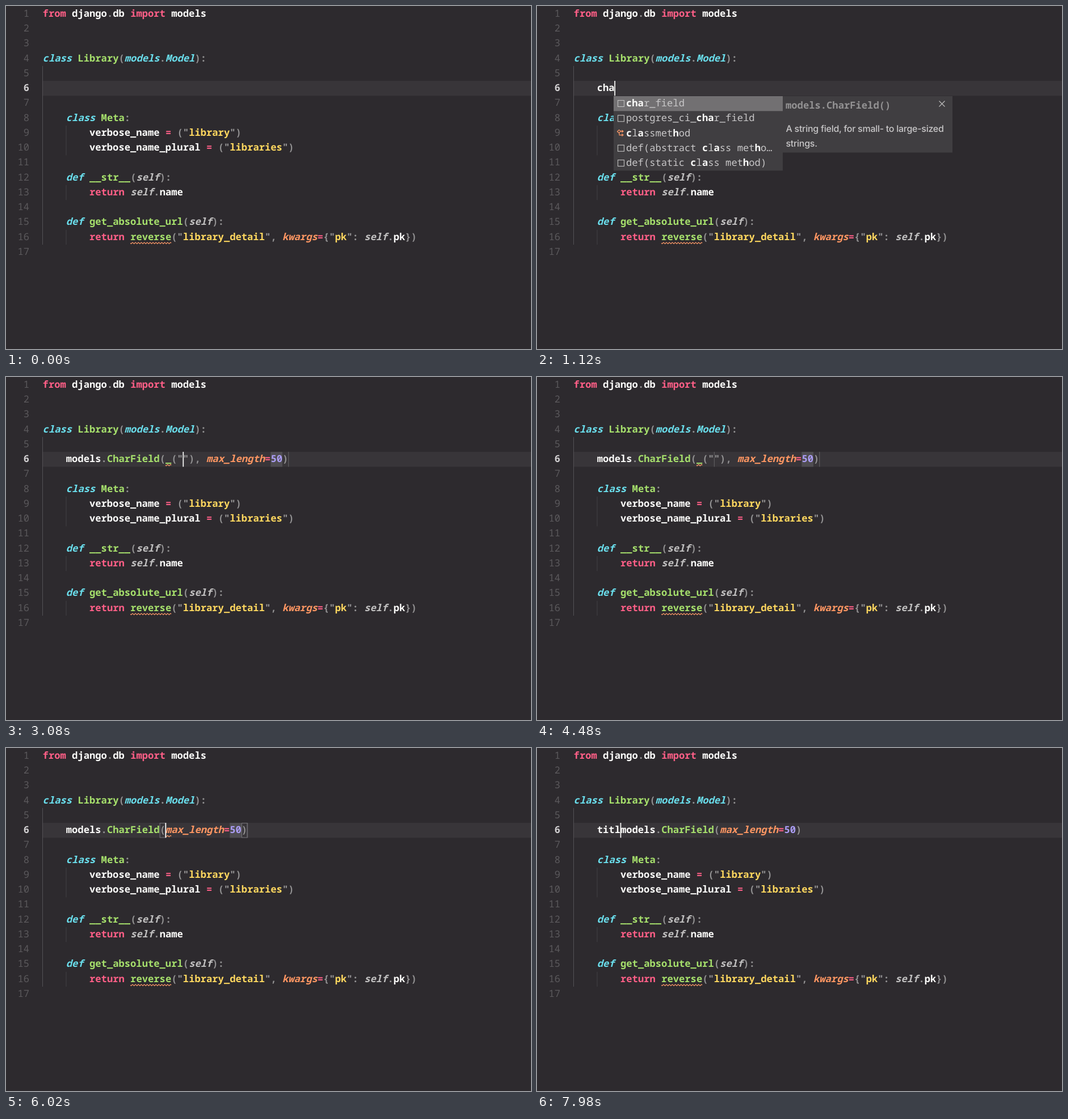
Animation, 925 px wide and 605 px high, one loop 8 s. Source, as an HTML page:

```html
<!DOCTYPE html>
<html lang="en">
<head>
<meta charset="utf-8">
<title>Model snippet</title>
<style>
  html, body { margin: 0; height: 100%; overflow: hidden; background: #2d2a2e; }
  svg { display: block; }
  text {
    font: 600 17.17px "Noto Sans Mono", monospace;
    white-space: pre;
    text-rendering: geometricPrecision;
  }
  .w { fill: #fcfcfa; }
  .g { fill: #939293; }
  .p { fill: #ff5f87; }
  .n { fill: #a6e06c; }
  .y { fill: #ffd85f; }
  .v { fill: #ab9df5; }
  .c { fill: #6adeec; font-style: italic; }
  .o { fill: #fe9662; font-style: italic; }
  .s { fill: #c1c0c0; font-style: italic; }
  .k { fill: #c8c7c8; font-weight: 500; }
  .b { fill: #fcfcfa; font-weight: 800; }
  .num { fill: #5b595c; text-anchor: end; font-weight: 500; }
  .now { fill: #d0ced0; font-weight: 600; }
  .doc { font: 500 16px Inter, sans-serif; letter-spacing: -.27px; fill: #c8c7c8; }
  .line { fill: none; stroke: #c1c0c0; stroke-width: 1.1; }
  .wave, .symbol { fill: none; stroke: #fc9867; stroke-width: 1.2; }
</style>
</head>
<body>
<svg id="stage" width="925" height="605"></svg>
<script>
const LEFT = 64.6, CHAR = 10.302, ROW = 26.27, LOOP = 8000;
const colX = col => LEFT + col * CHAR;
const rowY = row => 0.7 + (row - 1) * ROW;

// Code is split by "~"; the first letter of each piece is its style.
const code = {
  1: 'pfrom~w django~g.~wdb ~pimport~w models',
  4: 'cclass ~nLibrary~g(~cmodels~g.~cModel~g):',
  8: 'w    ~cclass ~nMeta~g:',
  9: 'w        verbose_name ~p=~g ("~ylibrary~g")',
  10: 'w        verbose_name_plural ~p=~g ("~ylibraries~g")',
  12: 'w    ~cdef ~n__str__~g(~sself~g):',
  13: 'w        ~preturn ~sself~g.~wname',
  15: 'w    ~cdef ~nget_absolute_url~g(~sself~g):',
  16: 'w        ~preturn ~nreverse~g("~ylibrary_detail~g", ~okwargs~p=~g{"~ypk~g": ~sself~g.~wpk~g})'
};

const field = (args = '', name = '') =>
  `w    ${name}models~g.~nCharField~g(${args}~omax_length~p=~v50~g)`;
const typed = name => 'w    ' + name;
const full = field('~n_~g(""), ');

// time, line 6, caret column, caret visible, marks: h snippet, s squiggle, b brackets, 5/2 popup rows
const states = [
  [0, typed(''), 4, 0, ''],
  [140, typed(''), 4, 1, ''],
  [560, typed(''), 4, 0, ''],
  [840, typed('c'), 5, 1, ''],
  [1120, typed('cha'), 7, 1, '5'],
  [1260, typed('char'), 8, 1, '2'],
  [1820, typed('char'), 8, 0, '2'],
  [2100, full, 24, 1, 'h'],
  [2520, full, 24, 0, 'h'],
  [3080, full, 24, 1, 'hs'],
  [3500, full, 24, 0, 'hs'],
  [4060, full, 24, 1, 'hs'],
  [4480, full, 24, 0, 'hs'],
  [4760, field('~n_~g(), '), 23, 1, 'hs'],
  [4900, field('~n_~g, '), 22, 1, 'hs'],
  [5040, field(', '), 21, 1, 'hs'],
  [5180, field(', '), 21, 1, 'hsb'],
  [5600, field(', '), 21, 0, 'hsb'],
  [5740, field(' '), 21, 1, 'hsb'],
  [6020, field(), 21, 1, 'hsb'],
  [6440, field(), 21, 0, 'hsb'],
  [6580, field(), 21, 1, 'b'],
  [6720, field(), 20, 1, 'b'],
  [6860, field(), 11, 1, ''],
  [7000, field(), 4, 1, ''],
  [7560, field('', 't'), 5, 1, ''],
  [7700, field('', 'ti'), 6, 1, ''],
  [7840, field('', 'tit'), 7, 1, ''],
  [7980, field('', 'titl'), 8, 1, '']
];

// Each suggestion as matched by "cha" and by "char".
const suggestions = [
  ['bcha~kr_field', 'bchar~k_field'],
  ['kpostgres_ci_~bcha~kr_field', 'kpostgres_ci_~bchar~k_field'],
  ['bc~kl~ba~kssmet~bh~kod'],
  ['kdef(abstract ~bc~kl~ba~kss met~bh~ko…'],
  ['kdef(static ~bc~kl~ba~kss met~bh~kod)']
];

const rect = (x, y, w, h, fill) =>
  `<rect x="${x}" y="${y}" width="${w}" height="${h}" fill="${fill}"/>`;
const frame = (x, y, w, h) =>
  `<rect class="line" x="${x}" y="${y}" width="${w}" height="${h}"/>`;
const text = (x, y, style, value) =>
  `<text x="${x}" y="${y}" class="${style}">${value}</text>`;
const path = (style, d) => `<path class="${style}" d="${d}"/>`;
const wave = (col, row, chars) =>
  path('wave', `M${colX(col)} ${rowY(row) + 23.4}` + 'l1.3 1.2l2.5 -2.4l1.35 1.2'.repeat(chars * 2));
const columns = line => line.split('~').join('').length - line.split('~').length;

function tokens(line, x, y) {
  return line.split('~').map(piece => {
    const out = text(x, y, piece[0], piece.slice(1));
    x += (piece.length - 1) * CHAR;
    return out;
  }).join('');
}

function popup(col, rows) {
  const x = Math.floor(colX(col) - .8), top = 159, side = x + 298;
  let out = rect(x, top, 298, rows * ROW, '#403e41') + rect(x, top, 298, 26.3, '#727072');
  for (let i = 0; i < rows; i++) {
    const y = top + i * ROW;
    out += i === 2
      ? path('symbol', `M${x + 6.5} ${y + 10}l3 -3l3 2l-3 3.5zM${x + 12} ${y + 9.5}h4` +
          `M${x + 10} ${y + 12}v4h5M${x + 15} ${y + 8}l2 1.5l-2 1.5zM${x + 15} ${y + 14.5}l2 1.5l-2 1.5z`)
      : frame(x + 7.5, y + 7.5, 11, 11);
    out += tokens(suggestions[i][rows === 5 ? 0 : 1], x + 22, y + 18.2);
  }
  return out + rect(side, top, 299, 99.5, '#403e41') +
    text(side + 5, 180.8, 'g', 'models.CharField()') +
    path('line', `M${side + 275.5} 167.5l10 10m0 -10l-10 10`) +
    text(side + 5.5, 221.8, 'doc', 'A string field, for small- to large-sized') +
    text(side + 5.5, 247.6, 'doc', 'strings.');
}

function draw([, line, col, caret, marks]) {
  const has = mark => marks.includes(mark);
  const end = columns(line);
  let out = rect(LEFT, 132, 861, 26.4, '#383539');

  out += rect(64, rowY(5), 1, 12 * ROW, '#535155');
  for (const [row, count] of [[9, 2], [13, 1], [16, 1]])
    out += rect(105.5, rowY(row), 1, count * ROW, '#434044');

  if (has('h')) {
    out += rect(colX(end - 3), 132, 2 * CHAR, 26.4, '#4f4d51');
    for (const c of [col, end]) out += rect(colX(c), 132, 1, 26.4, '#656367');
  }
  if (has('b'))
    for (const c of [20, end - 1])
      out += `<rect x="${colX(c) + .5}" y="132.5" width="9.6" height="25.5" fill="none" stroke="#77757a"/>`;

  for (let row = 1; row <= 17; row++) {
    const base = 18.7 + (row - 1) * ROW;
    out += text(41, base, row === 6 ? 'num now' : 'num', row);
    const content = row === 6 ? line : code[row];
    if (content) out += tokens(content, LEFT, base);
  }

  out += wave(15, 16, 7);
  if (has('s')) out += wave(21, 6, 1);
  if (caret) out += rect(colX(col) - .4, 132, 1.7, 26.3, '#fcfcfa');
  if (has('5') || has('2')) out += popup(col, has('5') ? 5 : 2);
  stage.innerHTML = out;
}

const stage = document.getElementById('stage');
let shown;
function tick() {
  const time = performance.now() % LOOP;
  const state = states.findLast(([start]) => start <= time);
  if (state !== shown) draw(shown = state);
  requestAnimationFrame(tick);
}
tick();
</script>
</body>
</html>
```
